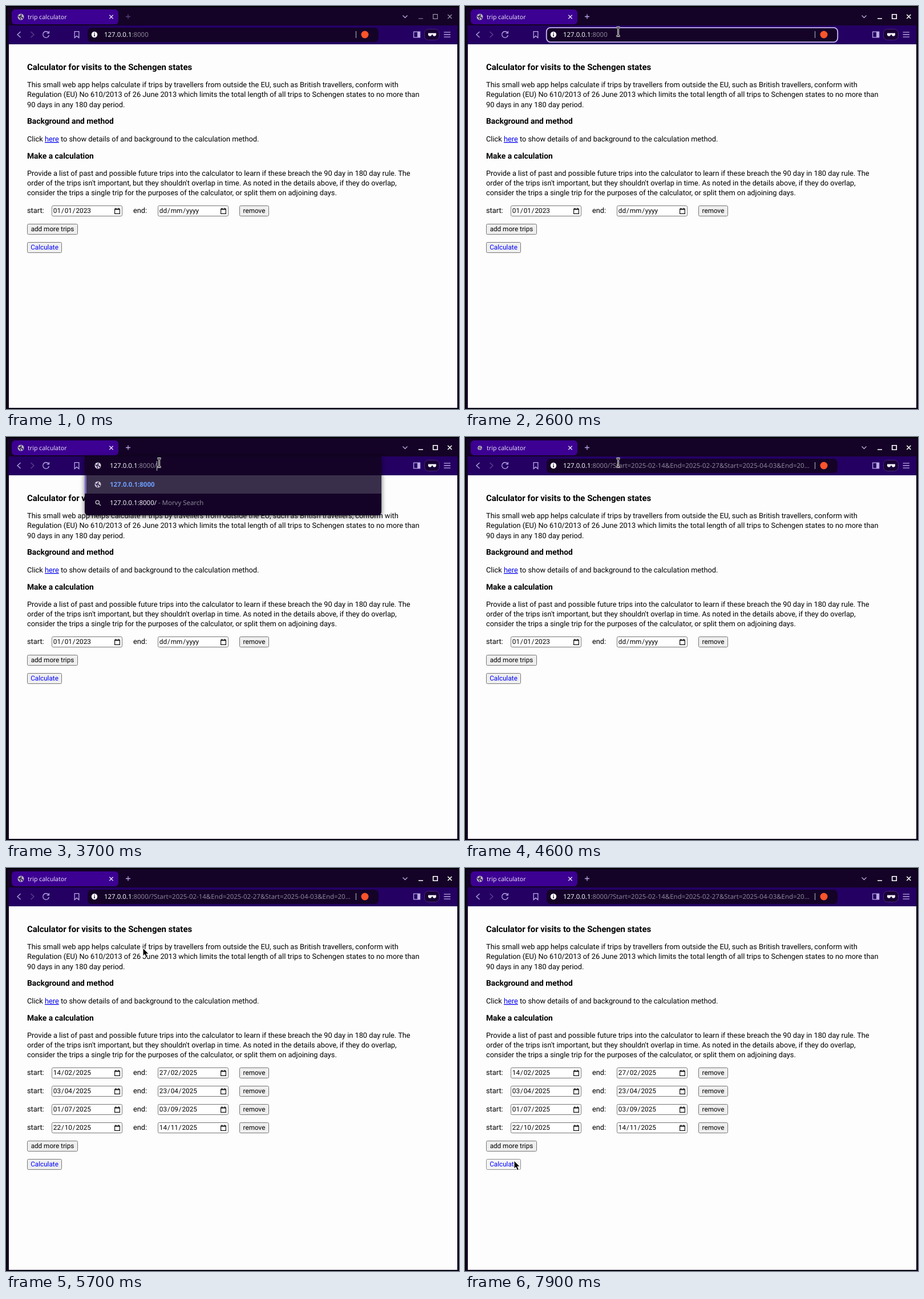
Animation of 794 by 705 pixels, one loop 8000 ms. Source, as an HTML page:

```html
<!DOCTYPE html>
<html lang="en">
<head>
<meta charset="utf-8">
<title>trip calculator</title>
<style>
  html, body { margin: 0; width: 100%; height: 100%; overflow: hidden; background: #000; }
  svg { display: block; width: 794px; height: 705px; }
  text { white-space: pre; text-rendering: geometricPrecision; }
  .page { font: 12.8px Roboto, sans-serif; }
  .page .ctl { font-size: 11.73px; }
  .page .title { font-size: 14.95px; font-weight: 700; }
  .page .head { font-size: 13.84px; font-weight: 700; }
  .ui { font: 11.44px "Noto Sans", sans-serif; fill: #f3f0f8; }
  .ui .tab { font-size: 10.56px; fill: #e6def5; }
  .ui .dim { fill: #8b8498; }
  .ui .match { font-weight: 700; fill: #6b9dfc; }
  .line { fill: none; stroke: #bba9e4; stroke-width: 1.3; }
  .btn { fill: #efefef; stroke: #767676; }
  .btn.hover { fill: #e5e5e5; stroke: #4f4f4f; }
  .btn.down { fill: #f5f5f5; stroke: #8d8d8d; }
</style>
</head>
<body>
<svg id="stage" viewBox="0 0 794 705"></svg>
<script>
const LOOP = 8000, STEP = 100;
const HOST = '127.0.0.1', PORT = ':8000';
const NEW_TRIPS = [
  ['14/02/2025', '27/02/2025'],
  ['03/04/2025', '23/04/2025'],
  ['01/07/2025', '03/09/2025'],
  ['22/10/2025', '14/11/2025']
];
const iso = date => date.split('/').reverse().join('-');
const QUERY = '/?' + NEW_TRIPS.map(([a, b]) => `Start=${iso(a)}&amp;End=${iso(b)}`).join('&amp;');
const SHORT_QUERY = QUERY.slice(0, QUERY.indexOf('&amp;End=2025-04') + 11) + '...';

const text = (x, y, str, cls = '', more = '') => `<text x="${x}" y="${y}" class="${cls}" ${more}>${str}</text>`;
const rect = (x, y, w, h, fill, more = '') => `<rect x="${x}" y="${y}" width="${w}" height="${h}" fill="${fill}" ${more}/>`;
const line = (d, more = '') => `<path class="line" d="${d}" ${more}/>`;
const group = (id, body, more = '') => `<g id="${id}" ${more}>${body}</g>`;
const url = (x, y, rest) => text(x, y, `${HOST}<tspan class="dim">${rest}</tspan>`);
const caret = (id, x) => rect(x, 42, 1, 17, '#cfc8dc', `id="${id}"`);

const globe = (x, y, color) => `<g transform="translate(${x} ${y})">
  <circle r="5.5" fill="${color}"/>
  <path d="M-4.4-1.5L-1.6.8-.6 3.8-.9 4.5M.2-4.4L.8-2.4-1.2-.8 1.8.6 2.8 2.4 4.2 1.5" fill="none" stroke="#241044" stroke-width="1.4"/></g>`;

function button(id, x, y, w, label, color = '#000') {
  return `<rect id="${id}" class="btn" x="${x + .5}" y="${y + .5}" width="${w - 1}" height="18" rx="2"/>`
    + text(x + w / 2, y + 13, label, 'ctl', `text-anchor="middle" fill="${color}"`);
}

function dateInput(x, y, value) {
  return rect(x + .5, y + .5, 123, 18, '#fff', 'stroke="#767676" rx="2"')
    + text(x + 2.8, y + 13, value, 'ctl', 'dx="0 0 .9 .9 0 .9 .9"')
    + `<path transform="translate(${x + 110} ${y + 4})" d="M.6 2H9.4V10.4H.6ZM2.5 0V2M7.5 0V2M.6 3H9.4" fill="none" stroke="#111" stroke-width="1.2"/>`;
}

function form(id, trips) {
  const rows = trips.map(([start, end], i) => {
    const y = 349 + 32 * i;
    return text(37, y + 13, 'start:') + dateInput(80, y, start)
      + text(223, y + 13, 'end:') + dateInput(266, y, end)
      + button(`${id}Remove${i}`, 409, y, 52, 'remove');
  }).join('');
  const y = 349 + 32 * trips.length;
  return group(id, rows + button(id + 'Add', 37, y, 89, 'add more trips')
    + button(id + 'Calc', 37, y + 32, 61, 'Calculate', '#00f'));
}

const COPY = [
  [112, 'Calculator for visits to the Schengen states', 'title'],
  [142, 'This small web app helps calculate if trips by travellers from outside the EU, such as British travellers, conform with'],
  [159, 'Regulation (EU) No 610/2013 of 26 June 2013 which limits the total length of all trips to Schengen states to no more than'],
  [177, '90 days in any 180 day period.'],
  [206, 'Background and method', 'head'],
  [237, 'Click <tspan fill="#00e" text-decoration="underline">here</tspan> to show details of and background to the calculation method.'],
  [267, 'Make a calculation', 'head'],
  [297, 'Provide a list of past and possible future trips into the calculator to learn if these breach the 90 day in 180 day rule. The'],
  [314, "order of the trips isn't important, but they shouldn't overlap in time. As noted in the details above, if they do overlap,"],
  [331, 'consider the trips a single trip for the purposes of the calculator, or split them on adjoining days.']
];

const frame = rect(2, 2, 791, 702, '#140326')
  + rect(5, 34, 786, 33, '#240063')
  + rect(10, 6, 187, 26, '#3c0092', 'rx="6"')
  + group('favicon', globe(0, 0, '#b9b4c4'))
  + text(38, 22.5, 'trip calculator', 'tab')
  + line('M181.3 15.8l6.4 6.4m0-6.4l-6.4 6.4', 'style="stroke:#e6def5"')
  + line('M695.5 16.5l4 4 4-4')
  + group('controls', line('M210 18.5h8m-4-4v8', 'id="plus"')
    + line('M723 22h8M748.7 14.7h7.6v7.6h-7.6zM774.3 15l7 7m0-7l-7 7', 'id="window"'))
  + line('M25.5 45l-5.5 5 5.5 5')
  + line('M43.5 45l5.5 5-5.5 5', 'style="stroke:#5d4391"')
  + line('M74.4 46.6A5.4 5.4 0 1 0 75.4 51M75.4 44v3.6h-3.8')
  + line('M120.2 44.6h7.6v11l-3.8-3.2-3.8 3.2z')
  + line('M714.6 45.1h11v9.8h-11z') + rect(721, 45, 5, 10, '#bba9e4')
  + rect(733.5, 40.5, 26, 19, '#180434', 'rx="7" stroke="#49257f"')
  + '<path d="M740 47.5H754V50.5Q753.4 52.8 750.8 52.8 748.2 52.8 747.6 49.8H746.4Q745.8 52.8 743.2 52.8 740.6 52.8 740 50.5Z" fill="#fff"/>'
  + line('M767.5 45.8h11.5M767.5 50h11.5M767.5 54.2h11.5');

const field = rect(143, 38, 510, 25, '#140327', 'rx="7"')
  + rect(142.8, 37.9, 510.4, 25.2, 'none', 'id="ring" rx="7" stroke="#c5b2f3" stroke-width="1.9"')
  + '<circle cx="155" cy="50" r="5.2" fill="#fff"/>' + rect(154.3, 49.3, 1.5, 3.8, '#140327') + rect(154.3, 46.7, 1.5, 1.5, '#140327')
  + group('urlBefore', url(172, 54, PORT)) + group('urlAfter', url(172, 54, PORT + SHORT_QUERY))
  + caret('fieldCaret', 249)
  + rect(613, 44, 1, 12, '#bdb3cf')
  + '<circle cx="629" cy="50" r="6.5" fill="#fb542b"/>';

const dropdown = `<path d="M138 34H658V131a6 6 0 0 1-6 6H144a6 6 0 0 1-6-6Z" fill="#140327" style="filter:drop-shadow(0 2px 4px #0009)"/>`
  + rect(138, 67, 520, 32, '#3a2f4b') + rect(138, 67, 3, 32, '#7967c5')
  + globe(161, 50, '#d5d0dd') + globe(161, 83, '#c9c4d2')
  + line('M163 117l3 3M163.4 114.2a3.1 3.1 0 1 1-6.2 0a3.1 3.1 0 1 1 6.2 0', 'style="stroke:#c9c4d2"')
  + group('typed', url(182, 54, PORT + '/') + text(182, 87, HOST + PORT, 'match')
    + text(182, 119, `${HOST}${PORT}/<tspan class="dim"> - Morvy Search</tspan>`) + caret('typedCaret', 264))
  + group('pasted', text(636, 54, PORT + QUERY, 'dim', 'text-anchor="end"')
    + text(182, 87, HOST + PORT + QUERY, 'match') + text(182, 119, HOST + PORT + QUERY)
    + caret('pastedCaret', 636), 'clip-path="url(#textArea)"');

const pointers = group('arrow', '<path d="M0 0V14.2L3.2 11.2 5.6 16.8 8.3 15.6 5.9 10.2H10.2Z" fill="#000" stroke="#fff" stroke-width="1" stroke-linejoin="round"/>')
  + group('beam', ['#fff', '#000'].map((c, i) =>
    `<path d="M-3.2-7.5H-1.2L0-6.5 1.2-7.5H3.2M0-6.5V6.5M-3.2 7.5H-1.2L0 6.5 1.2 7.5H3.2" fill="none" stroke="${c}" stroke-width="${i ? 1.1 : 3}"/>`).join(''));

const stage = document.getElementById('stage');
stage.innerHTML = '<clipPath id="textArea"><path d="M182 34H658V137H182Z"/></clipPath>'
  + `<g class="ui">${frame}${field}</g>`
  + rect(5, 67, 786, 636, '#fdfdfd')
  + `<g class="page">${COPY.map(([y, str, cls]) => text(37, y, str, cls)).join('')}`
  + form('before', [['01/01/2023', 'dd/mm/yyyy']]) + form('after', NEW_TRIPS) + '</g>'
  + group('dropdown', dropdown, 'class="ui"') + pointers;

const el = id => document.getElementById(id);
const show = (id, on) => { el(id).style.display = on ? '' : 'none'; };
const within = (t, from, to) => t >= from && t < to;

// time, x, y of the pointer
const PATH = [
  [500, 142, -12], [600, 148, 0], [700, 156, 7], [800, 163, 12], [900, 184, 20], [1000, 216, 31],
  [1200, 256, 42], [1300, 264, 42], [1600, 268, 44], [1900, 268, 44], [2000, 268.5, 45],
  [5400, 268.5, 45], [5500, 267, 51], [5700, 240, 140], [5900, 168, 310], [6100, 118, 425],
  [6300, 105, 467], [6400, 105, 477], [6800, 100, 486], [7200, 91, 502], [7300, 88, 509],
  [7400, 87, 511], [7700, 86, 512], [8000, 86, 512]
];

function pointerAt(t) {
  const i = Math.max(1, PATH.findIndex(p => p[0] >= t));
  const [t0, x0, y0] = PATH[i - 1], [t1, x1, y1] = PATH[i];
  const k = Math.max(0, (t - t0) / (t1 - t0));
  return [x0 + (x1 - x0) * k, y0 + (y1 - y0) * k];
}

function draw(now) {
  const t = Math.floor(now % LOOP / STEP) * STEP;
  const active = t >= 600, sent = t >= 4600, loaded = t >= 4700;

  el('plus').style.stroke = active ? '#bba9e4' : '#55427a';
  el('window').style.stroke = active ? '#fff' : '#9a8fac';
  el('window').style.strokeWidth = active ? 1.6 : 1.2;
  show('ring', within(t, 800, 4600));
  show('fieldCaret', within(t, 800, 1300) || within(t, 1800, 2600));
  show('urlBefore', !sent);
  show('urlAfter', sent);
  show('dropdown', within(t, 2700, 4600));
  show('typed', t < 3900);
  show('typedCaret', !within(t, 3200, 3700));
  show('pasted', t >= 3900);
  show('pastedCaret', t < 4400);
  show('before', !loaded);
  show('after', loaded);
  const size = within(t, 4600, 4800) ? .7 : within(t, 4800, 4900) ? .85 : 1;
  el('favicon').setAttribute('transform', `translate(26 19) scale(${size})`);

  const [x, y] = pointerAt(t);
  const beam = within(t, 1100, 5600);
  show('arrow', t >= 500 && !beam);
  show('beam', beam);
  el(beam ? 'beam' : 'arrow').setAttribute('transform', `translate(${x} ${y})`);
  el('afterAdd').setAttribute('class', within(t, 6400, 7100) ? 'btn hover' : 'btn');
  el('afterCalc').setAttribute('class', t >= 7900 ? 'btn down' : t >= 7300 ? 'btn hover' : 'btn');
}

const begin = performance.now();
function tick() {
  draw(performance.now() - begin);
  requestAnimationFrame(tick);
}
tick();
</script>
</body>
</html>
```
